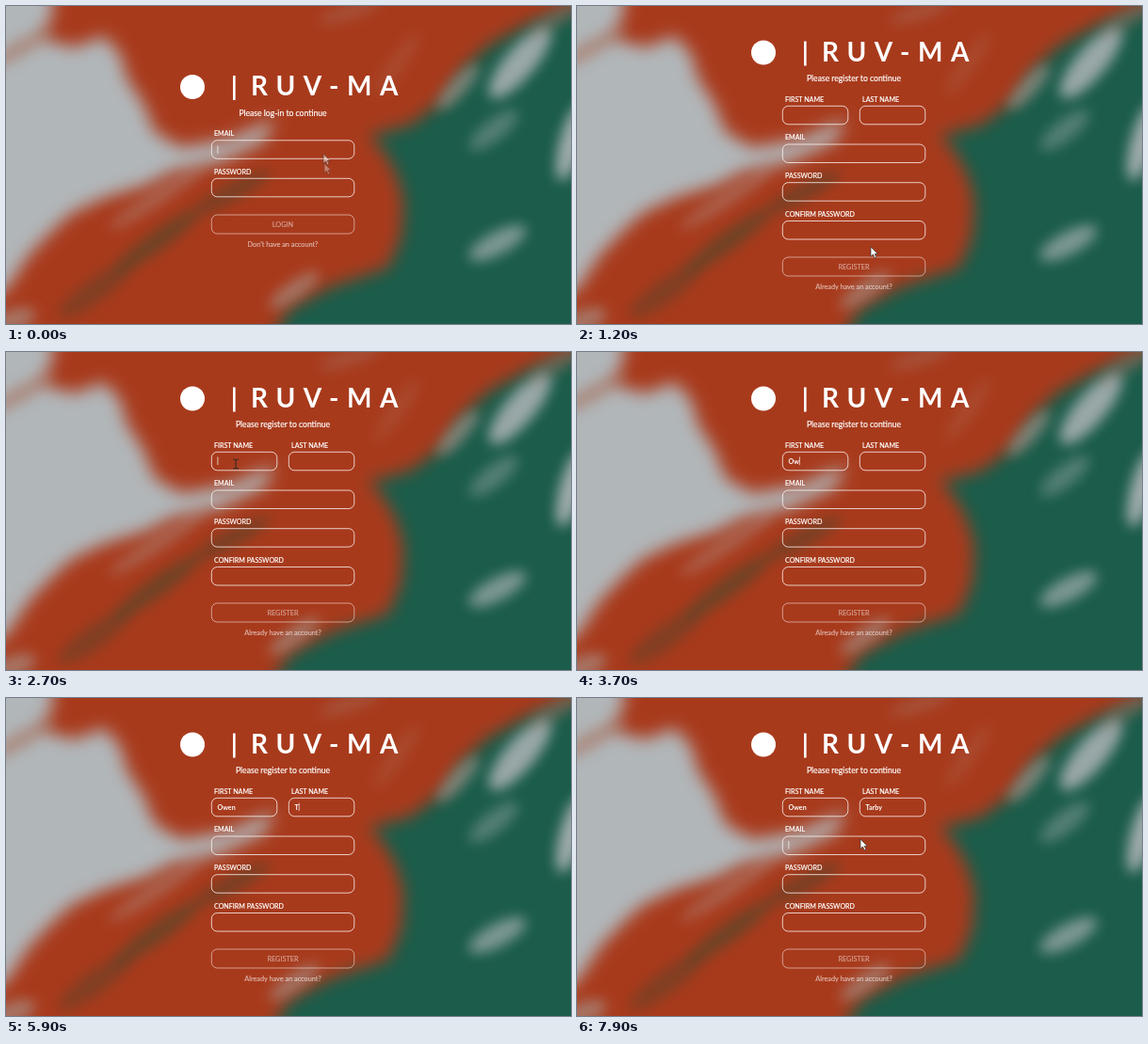
These frames come from a looping animation (600x338 px, 8000 ms). An HTML page:

```html
<!DOCTYPE html>
<html lang="en">
<head>
<meta charset="utf-8">
<style>
html, body { margin: 0; height: 100%; overflow: hidden; background: #a83a1c; }
svg { display: block; width: 600px; height: 338px; font-family: Lato, sans-serif; fill: #fff; }
.brand { font-size: 28px; font-weight: 700; letter-spacing: 8.6px; }
.sub { font-size: 8.6px; text-anchor: middle; stroke: #fff; stroke-width: .2; }
.label { font-size: 7.1px; font-weight: 500; stroke: #fff; stroke-width: .15; }
.value { font-size: 7.1px; font-weight: 700; }
.action { font-size: 7.3px; text-anchor: middle; stroke: #fff; stroke-width: .2; }
.box { fill: none; stroke: #fff; stroke-opacity: .75; }
</style>
</head>
<body>
<svg viewBox="0 0 600 338">
  <defs>
    <filter id="soft" filterUnits="userSpaceOnUse" x="-60" y="-60" width="720" height="460" color-interpolation-filters="sRGB"><feGaussianBlur stdDeviation="9"/></filter>
    <filter id="fine" filterUnits="userSpaceOnUse" x="-60" y="-60" width="720" height="460" color-interpolation-filters="sRGB"><feGaussianBlur stdDeviation="7"/></filter>
    <path id="arrow" d="M0 0V10.2L2.4 8L4.2 11.8L5.9 11L4.2 7.4H7.3Z" fill="#fff" stroke="#333" stroke-width=".7"/>
    <path id="beam" d="M-3-5Q0-5 0-3.5Q0-5 3-5M0-4V4M-3 5Q0 5 0 3.5Q0 5 3 5" fill="none" stroke="#332c29" stroke-width="1.1"/>
  </defs>
  <g id="paint"></g>
  <g id="login"></g>
  <g id="register"></g>
  <rect id="caret" width=".8" height="8.5"/>
  <use id="ghost"/>
  <use id="cursor"/>
</svg>
<script>
const NS = 'http://www.w3.org/2000/svg', LOOP = 8000, LAG = 100;
const $ = id => document.getElementById(id);

function add(parent, tag, attrs, text = '') {
  const el = parent.appendChild(document.createElementNS(NS, tag));
  for (const key in attrs) el.setAttribute(key, attrs[key]);
  el.textContent = text;
  return el;
}
const put = (parent, cls, x, y, text) => add(parent, 'text', { class: cls, x, y }, text);
const box = (parent, x, y, width, height = 19.5) =>
  add(parent, 'rect', { class: 'box', x, y, width, height, rx: 6 });

// Blurred paint backdrop
const soft = add($('paint'), 'g', { filter: 'url(#soft)' });
const fine = add($('paint'), 'g', { filter: 'url(#fine)' });
const blob = (fill, d) => add(soft, 'path', { fill, d });
const streak = (cx, cy, rx, ry, turn, fill, opacity) =>
  add(fine, 'ellipse', { rx, ry, fill, opacity, transform: `translate(${cx} ${cy}) rotate(${turn})` });

blob('#a83a1c', 'M-80-80H680V420H-80Z');
blob('#b1b6b9', 'M-80-80H44L50 8L38 34L72 44L104 32L122 52L128 76L146 104L158 134L186 150L236 142L286 120L274 144L226 166L176 176L150 190L104 204L70 220L50 238L25 264L0 302L-80 340Z');
blob('#1b5c4a', 'M680-30L600 2L556 18L512 42L484 68L464 100L430 126L386 138L400 152L414 178L422 206L420 244L406 278L346 298L300 322L262 390L262 420H680Z');
streak(16, 44, 40, 9, -30, '#a6664f', .5);
streak(160, 204, 60, 8, -33, '#b1aaa6', .35);
streak(240, 198, 46, 9, -28, '#56452c', .6);
streak(160, 250, 58, 10, -36, '#56482c', .7);
streak(95, 302, 48, 12, -36, '#5a452b', .5);
streak(5, 335, 28, 12, -20, '#a79b95', .6);
streak(306, 302, 32, 9, -35, '#a3968c', .65);
streak(365, 6, 34, 8, -18, '#a37f70', .35);
streak(415, 62, 40, 8, -55, '#b06a50', .35);
streak(480, 86, 32, 9, -48, '#a59c96', .65);
streak(546, 60, 48, 16, -50, '#b1b6b9', .85);
streak(518, 132, 32, 11, -38, '#9cacaa', .45);
streak(600, 145, 42, 12, -75, '#b1b6b9', .9);
streak(522, 252, 34, 12, -28, '#a9b3b2', .7);
streak(582, 14, 34, 9, -32, '#86766a', .5);

function header(parent, y, sub) {
  add(parent, 'circle', { cx: 198, cy: y - 9, r: 13 });
  add(parent, 'rect', { x: 241, y: y - 21, width: 2.6, height: 26 });
  put(parent, 'brand', 260, y, 'RUV-MA');
  put(parent, 'sub', 294, y + 21.6, sub);
}
function field(parent, x, y, width, label) {
  put(parent, 'label', x + 2.7, y - 4.6, label);
  box(parent, x, y, width);
}
function footer(parent, y, action, link) {
  box(parent, 218.3, y, 151.5, 20).style.strokeOpacity = .5;
  put(parent, 'action', 294, y + 12.6, action).setAttribute('opacity', .5);
  return put(parent, 'action', 294, y + 34, link);
}

header($('login'), 95, 'Please log-in to continue');
field($('login'), 218.3, 142.8, 151.5, 'EMAIL');
field($('login'), 218.3, 183.3, 151.5, 'PASSWORD');
const link = footer($('login'), 222, 'LOGIN', "Don't have an account?");

header($('register'), 58.5, 'Please register to continue');
field($('register'), 218.3, 106.3, 69.5, 'FIRST NAME');
field($('register'), 300.3, 106.3, 69.5, 'LAST NAME');
field($('register'), 218.3, 147, 151.5, 'EMAIL');
field($('register'), 218.3, 187.7, 151.5, 'PASSWORD');
field($('register'), 218.3, 228.5, 151.5, 'CONFIRM PASSWORD');
footer($('register'), 267, 'REGISTER', 'Already have an account?').setAttribute('opacity', .6);

// Typed values: start time and time per letter
const names = [
  { text: 'Owen', start: 3500, step: 180, el: put($('register'), 'value', 224.5, 118.6, '') },
  { text: 'Tarby', start: 5800, step: 150, el: put($('register'), 'value', 306.5, 118.6, '') },
];

// Focus changes: time, x, y, typed value
const focus = [
  [0, 224.5, 148.5], [500], [2400, 224.5, 111.5, names[0]],
  [5300, 306.5, 111.5, names[1]], [7400, 224.5, 152],
];

// Pointer path: time, x, y, shape from then on
const path = [
  [-100, 337, 157, 'arrow'], [0, 338, 167, 'arrow'], [400, 314, 249, 'arrow'], [600, 312, 256, 'arrow'],
  [1350, 312, 256, 'arrow'], [1600, 309, 235, 'arrow'], [1700, 311, 239, 'beam'], [1850, 306, 222, 'arrow'],
  [2200, 244, 119, 'beam'], [3400, 244, 119, ''], [4450, 246, 118, 'beam'], [4600, 256, 117, 'beam'],
  [4700, 263, 117, 'beam'], [5150, 332, 117, 'beam'], [5750, 332, 117, ''], [6800, 332, 117, 'beam'],
  [7000, 326, 122, 'arrow'], [7350, 301, 150, 'arrow'], [8000, 301, 150, 'arrow'],
];
const last = (list, t) => list.findLastIndex(k => k[0] <= t);

function pose(t) {
  const i = last(path, t), a = path[i], b = path[i + 1] || a;
  const u = b === a ? 0 : (t - a[0]) / (b[0] - a[0]);
  return { x: a[1] + (b[1] - a[1]) * u, y: a[2] + (b[2] - a[2]) * u, shape: a[3] };
}
function show(el, p, opacity) {
  el.setAttribute('href', '#' + p.shape);
  el.setAttribute('transform', `translate(${p.x} ${p.y})`);
  el.setAttribute('opacity', p.shape ? opacity : 0);
}

function draw(t) {
  const registering = t >= 1000;
  $('login').style.display = registering ? 'none' : '';
  $('register').style.display = registering ? '' : 'none';
  link.setAttribute('opacity', t >= 400 ? 1 : .6);

  for (const n of names)
    n.el.textContent = n.text.slice(0, Math.max(0, Math.floor((t - n.start) / n.step) + 1));

  const [since, x, y, name] = focus[last(focus, t)];
  const typing = name && t >= name.start && t < name.start + name.text.length * name.step + 500;
  const lit = x && (typing || (t - since) % 1000 < 600);
  $('caret').setAttribute('opacity', lit ? .85 : 0);
  if (x) {
    $('caret').setAttribute('x', x + (name ? name.el.getComputedTextLength() : 0));
    $('caret').setAttribute('y', y);
  }

  const now = pose(t), before = pose(t - LAG);
  const moving = now.x !== before.x || now.y !== before.y;
  show($('ghost'), before, moving ? .55 : 0);
  show($('cursor'), now, moving ? .35 : 1);
}

function tick() {
  draw(performance.now() % LOOP);
  requestAnimationFrame(tick);
}
tick();
</script>
</body>
</html>
```
